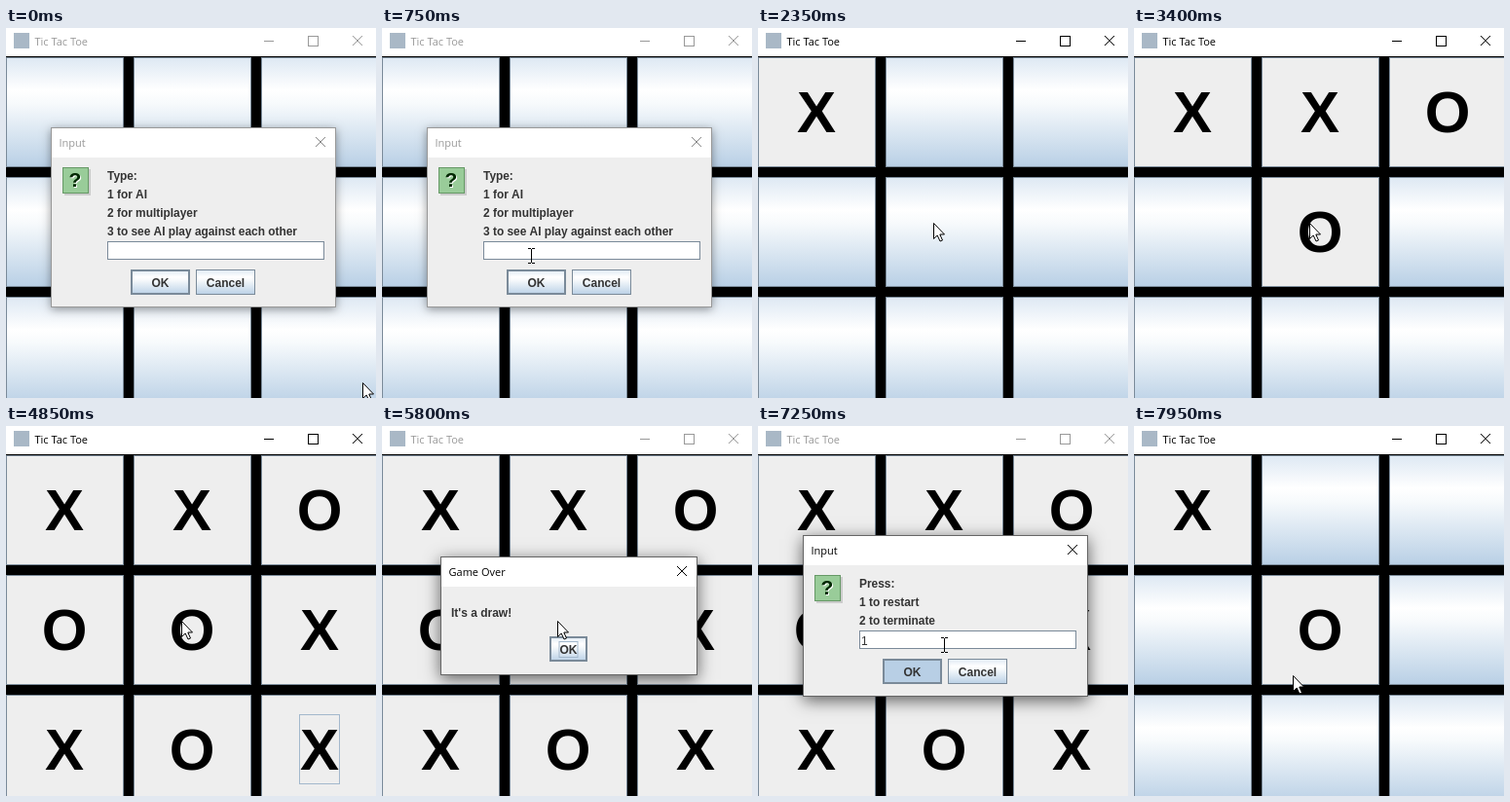
Animation of 380x380 px, one loop 8 s. Source, as an HTML page with a canvas:

```html
<!DOCTYPE html>
<html lang="en">
<head>
<meta charset="utf-8">
<title>Tic Tac Toe</title>
<style>
html, body { margin: 0; width: 100%; height: 100%; overflow: hidden; background: #000; }
canvas { display: block; }
</style>
</head>
<body>
<canvas id="stage" width="380" height="380"></canvas>
<script>
const g = document.getElementById('stage').getContext('2d');
const LOOP = 8000;
const BOLD = '"Liberation Sans", Arial, sans-serif';
const CAPTION = '11px "Open Sans", "Noto Sans", sans-serif';
const STEEL = '#7a8a99', PRESSED = '#b8cfe5', PANEL = '#eee';

// Each move: time, cell, mark
const firstGame = [
  [2000, 0, 'X'], [2400, 4, 'O'], [2750, 1, 'X'], [3100, 2, 'O'], [3750, 6, 'X'],
  [4000, 3, 'O'], [4300, 5, 'X'], [4550, 7, 'O'], [4850, 8, 'X']
];
const secondGame = [[7450, 0, 'X'], [7700, 4, 'O']];
const RESTART = 7300;

// Pointer stops: time, x, y
const pointerPath = [
  [0, 366, 364], [50, 366, 364], [800, 150, 232], [1750, 150, 232], [2250, 180, 200],
  [6050, 180, 200], [6500, 191, 225], [7250, 191, 225], [7850, 163, 256], [LOOP, 163, 256]
];

const within = (t, from, to) => t >= from && t < to;

function box(x, y, w, h, fill, line) {
  g.fillStyle = fill;
  g.fillRect(x, y, w, h);
  if (line) frame(x, y, w, h, line);
}

function frame(x, y, w, h, color) {
  g.strokeStyle = color;
  g.lineWidth = 1;
  g.strokeRect(x + .5, y + .5, w - 1, h - 1);
}

function label(text, x, y, font, color, align = 'left') {
  g.font = font;
  g.fillStyle = color;
  g.textAlign = align;
  g.fillText(text, x, y);
}

function strokePath(color, ...lines) {
  g.strokeStyle = color;
  g.lineWidth = 1;
  g.beginPath();
  for (const [x, y, x2, y2] of lines) {
    g.moveTo(x, y);
    g.lineTo(x2, y2);
  }
  g.stroke();
}

const closeMark = (x, y, color) =>
  strokePath(color, [x, y, x + 10, y + 10], [x + 10, y, x, y + 10]);

function gloss(y, h) {
  const fill = g.createLinearGradient(0, y, 0, y + h);
  fill.addColorStop(0, '#dde8f3');
  fill.addColorStop(.3, '#fff');
  fill.addColorStop(.42, '#f7fafc');
  fill.addColorStop(1, PRESSED);
  return fill;
}

function drawWindow(active) {
  box(0, 0, 380, 29, '#fff');
  box(8, 5, 16, 16, '#a9b8c6');
  const ink = active ? '#000' : '#999';
  label('Tic Tac Toe', 29.5, 18, CAPTION, ink);
  strokePath(ink, [265, 13.5, 275, 13.5]);
  frame(310, 8, 11, 11, ink);
  closeMark(356, 8, ink);
}

function drawBoard(t) {
  box(0, 29, 380, 351, '#000');
  const marks = {};
  for (const [at, cell, mark] of t < RESTART ? firstGame : secondGame)
    if (t >= at) marks[cell] = mark;
  for (let i = 0; i < 9; i++) {
    const x = i % 3 * 131, y = 30 + Math.floor(i / 3) * 123;
    box(x, y, 121, 113, marks[i] ? PANEL : gloss(y, 113), STEEL);
    if (!marks[i]) continue;
    label(marks[i], x + 60, y + 77, `bold 60px ${BOLD}`, '#000', 'center');
    if (i === 8 && t < 5100) frame(x + 39, y + 20, 42, 72, '#a3b8cc');
  }
}

function drawDialog(title, x, y, w, h, active) {
  g.save();
  g.shadowColor = active ? 'rgba(0,0,0,.6)' : 'rgba(0,0,0,.4)';
  g.shadowBlur = active ? 16 : 9;
  g.shadowOffsetY = active ? 4 : 2;
  box(x, y, w, h, PANEL);
  g.restore();
  box(x, y, w, 31, '#fff');
  frame(x, y, w, h, active ? '#666' : '#999');
  label(title, x + 8.5, y + 20, CAPTION, active ? '#000' : '#999');
  closeMark(x + w - 21, y + 10, active ? '#000' : '#888');
}

function drawButton(text, x, y, w, { main, pressed, focus } = {}) {
  box(x, y, w, 26, pressed ? PRESSED : gloss(y, 26), STEEL);
  if (main) frame(x + 1, y + 1, w - 2, 24, STEEL);
  if (focus) frame(x + w / 2 - 10, y + 5, 20, 17, '#a3b8cc');
  label(text, x + w / 2, y + 18, `bold 12px ${BOLD}`, '#333', 'center');
}

function drawQuestion(x, y) {
  box(x + 2, y + 2, 27, 27, '#ccc');
  box(x, y, 27, 27, '#99cc99', '#669966');
  label('?', x + 14, y + 21, `bold 21px ${BOLD}`, '#fff', 'center');
  label('?', x + 13, y + 20, `bold 21px ${BOLD}`, '#002800', 'center');
}

function drawInput(y, lines, { active, value, caret, pressed }) {
  const field = y + 41 + 19 * lines.length;
  drawDialog('Input', 46, y, 293, field + 68 - y, active);
  drawQuestion(58, y + 41);
  lines.forEach((line, i) =>
    label(line, 104, y + 54 + 19 * i, `bold 11.9px ${BOLD}`, '#333'));
  box(104, field, 223, 19, '#fff', STEEL);
  label(value, 106, field + 15, `12px ${BOLD}`, '#333');
  if (caret) box(value ? 113 : 106, field + 2, 1, 15, '#333');
  drawButton('OK', 128, field + 29, 61, { main: true, pressed });
  drawButton('Cancel', 195, field + 29, 61);
}

function pointerAt(t) {
  const i = pointerPath.findIndex(p => p[0] > t);
  const [t0, x0, y0] = pointerPath[i - 1], [t1, x1, y1] = pointerPath[i];
  const k = (t - t0) / (t1 - t0), e = k * k * (3 - 2 * k);
  return [x0 + (x1 - x0) * e, y0 + (y1 - y0) * e].map(Math.round);
}

function drawPointer(x, y, beam) {
  g.save();
  g.translate(x, y);
  if (beam) {
    strokePath('#000', [.5, -7, .5, 7], [-3, -7.5, 0, -7.5], [1, -7.5, 4, -7.5],
      [-3, 7.5, 0, 7.5], [1, 7.5, 4, 7.5]);
  } else {
    const arrow = new Path2D('M.5 .5V16.5L4.2 13L7 19L9.5 18L6.8 12H11.5Z');
    g.fillStyle = '#fff';
    g.fill(arrow);
    g.strokeStyle = '#000';
    g.lineWidth = 1;
    g.stroke(arrow);
  }
  g.restore();
}

function draw(t) {
  const start = t < 1700, over = within(t, 5100, 6050), again = within(t, 6100, RESTART);
  const [x, y] = pointerAt(t);
  drawWindow(!start && !over && !again);
  drawBoard(t);
  if (start) {
    drawInput(102, ['Type:', '1 for AI', '2 for multiplayer', '3 to see AI play against each other'], {
      active: t >= 900, value: t >= 1150 ? '3' : '',
      caret: within(t, 900, 1500), pressed: t >= 1600
    });
  }
  if (over) {
    drawDialog('Game Over', 60, 134, 264, 122, true);
    label("It's a draw!", 71, 196, `bold 12px ${BOLD}`, '#333');
    drawButton('OK', 172, 216, 39, { main: true, focus: true, pressed: t >= 5950 });
  }
  if (again) {
    drawInput(112, ['Press:', '1 to restart', '2 to terminate'], {
      active: true, value: t >= 6950 ? '1' : '', caret: t < 7150, pressed: t >= 7200
    });
  }
  const field = start ? 219 : again ? 210 : 999;
  drawPointer(x, y, x > 104 && x < 327 && y > field && y < field + 19);
}

function tick() {
  draw(performance.now() % LOOP);
  requestAnimationFrame(tick);
}
tick();
</script>
</body>
</html>
```
